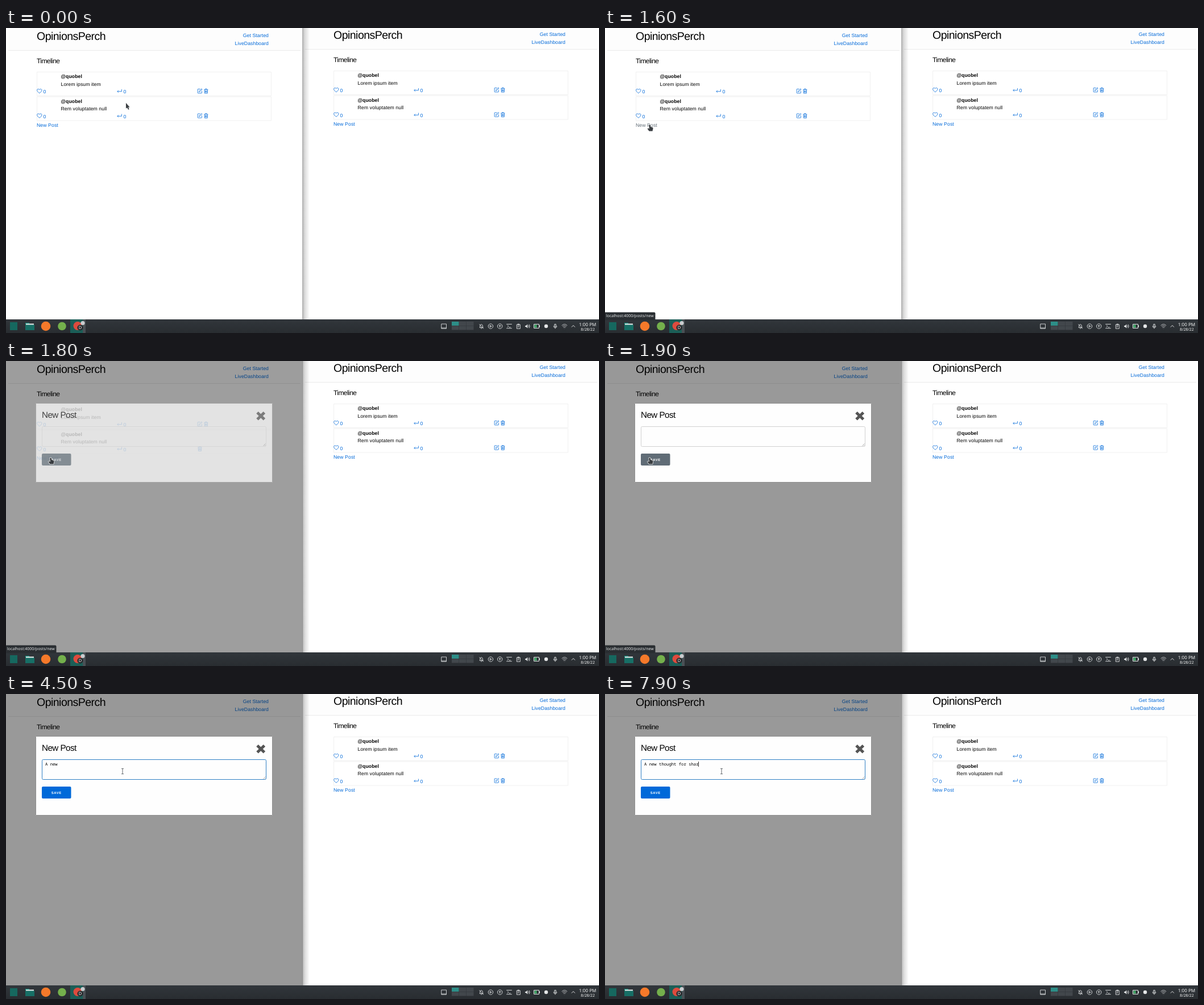
An HTML page with a canvas for the animation above (8 s loop, 1043 px wide and 537 px high).

```html
<!DOCTYPE html>
<html lang="en">
<head>
<meta charset="utf-8">
<title>Timeline</title>
<style>
  html, body { margin: 0; width: 100%; height: 100%; overflow: hidden; background: #fff; }
  canvas { display: block; }
</style>
</head>
<body>
<canvas id="stage" width="1043" height="537"></canvas>
<script>
const ctx = document.getElementById('stage').getContext('2d');
const LOOP = 8000, BLUE = '#0069d9', GREY = '#606c76', TRAY = '#e4e6e7';
const REM = 5.43, BODY = 1.6 * REM;
const SANS = '"Liberation Sans", Arial, sans-serif';
const UI = '"Noto Sans", sans-serif';
const MONO = '"Noto Sans Mono", monospace';
const MONO_SIZE = 7.24;

const ICONS = {
  heart: 'M8 14.5C-4 7 2-1 8 4C14-1 20 7 8 14.5Z',
  reply: 'M14.5 2.5V9H1.5M5 5.5L1.5 9L5 12.5',
  edit: 'M14 8v5.5a1 1 0 0 1-1 1h-10.500a1 1 0 0 1-1-1v-10.500a1 1 0 0 1 1-1h6.500M5.500 10.500l.5-2.500L13 1l2 2L8 10Z',
  trash: 'M2 3.500h12M6 3V1.500h4V3M3.200 4l.6 11h8.400l.6-11M6 6.500v6M8 6.500v6M10 6.500v6',
  screen: 'M.5 1H15.500V15H.5ZM.5 13H15.500',
  bell: 'M3 12C5 9 3 3 8 2.500C13 3 11 9 13 12ZM6.500 14.500h3M2 2L14 15',
  play: 'M8 1a7 7 0 1 0 .01 0M6 5L11 8L6 11Z',
  up: 'M8 1a7 7 0 1 0 .01 0M8 12V5M5 8L8 4.500L11 8',
  term: 'M0 2H16M0 14H16M3 5L6 8L3 11M8 11h4',
  clip: 'M3 3H13V15H3ZM6 1.500H10V4H6ZM5.500 7.500h5M5.500 10.500h3',
  mic: 'M6 2H10V9H6ZM3.500 7V9Q4 12 8 12T12.500 9V7M8 12V15',
  wifi: 'M0 6Q8-2 16 6M2.500 9Q8 3.500 13.500 9M5 12Q8 9 11 12M8 14.500v.5',
  caret: 'M3 10.500L8 5.500L13 10.500'
};
for (const k in ICONS) ICONS[k] = new Path2D(ICONS[k]);

const ARROW = new Path2D('M0 0V9.500L2.200 8.200L4 11.800L5.600 11L4 7.400H6.600Z');
const HAND = new Path2D('M-1.300 .5Q0-1 1.200 .5L1.800 3.500L5 4.500Q6.200 5 6 6.500L5 11H-1L-3.600 7.200Q-3.800 6-2.400 6L-.6 7Z');
const SPEAKER = new Path2D('M1 6H4L8 2V14L4 10H1Z');
const WAVES = new Path2D('M10.500 5Q13 8 10.500 11M12.500 2.500Q17 8 12.500 13.500');

// [time, characters shown]
const TYPING = [[3100, 1], [3300, 2], [3600, 3], [3700, 4], [3800, 6], [4800, 8], [5100, 10],
  [5200, 11], [5400, 12], [5500, 13], [5600, 14], [6400, 15], [6500, 16], [6600, 18],
  [7500, 19], [7600, 20], [7700, 21], [7900, 22]];
const MESSAGE = 'A new thought for shar';
const CARET_OFF = [[4500, 4800], [6200, 6400], [7200, 7500]];

// [time, x, y] of the pointer's hot spot
const MOVES = [[0, 211, 132], [900, 86, 170.5], [1100, 78.5, 170.5], [1900, 78.5, 170.5], [2400, 205, 136]];

const within = (t, a, b) => t >= a && t < b;
const ease = p => p * p * (3 - 2 * p);

function rect(x, y, w, h, color) {
  ctx.fillStyle = color;
  ctx.fillRect(x, y, w, h);
}

function frame(x, y, w, h, color, r = 0) {
  ctx.beginPath();
  ctx.roundRect(x + .5, y + .5, w - 1, h - 1, r);
  ctx.strokeStyle = color;
  ctx.lineWidth = 1;
  ctx.stroke();
}

function disc(x, y, r, color) {
  ctx.beginPath();
  ctx.arc(x, y, r, 0, 7);
  ctx.fillStyle = color;
  ctx.fill();
}

function text(str, x, y, { size = BODY, color = '#000', font = SANS, weight = 400, gap = .087, align = 'left' } = {}) {
  ctx.font = `${weight} ${size}px ${font}`;
  ctx.letterSpacing = gap + 'px';
  ctx.textAlign = align;
  ctx.fillStyle = color;
  ctx.fillText(str, x, y);
}

function icon(name, x, y, color = BLUE, scale = .58, line = 1.35) {
  ctx.save();
  ctx.translate(x, y);
  ctx.scale(scale, scale);
  ctx.strokeStyle = color;
  ctx.lineWidth = line;
  ctx.stroke(ICONS[name]);
  ctx.restore();
}

const heading = (str, x, y, rems) => text(str, x, y, { size: rems * REM, gap: -.1 * REM });

function post(y, body, canEdit) {
  frame(54, y, 413, 43, '#f0f0f0');
  text('@quobel', 96.5, y + 11, { weight: 700 });
  text(body, 96.5, y + 24.5);
  icon('heart', 54, y + 29, BLUE, .6);
  text('0', 65.5, y + 38, { color: BLUE });
  icon('reply', 195, y + 29.5);
  text('0', 206.5, y + 38, { color: BLUE });
  if (canEdit) icon('edit', 336.3, y + 29.3);
  icon('trash', canEdit ? 347.2 : 336.3, y + 29.3);
}

function page(dx, dy, hover, canEdit) {
  ctx.save();
  ctx.translate(dx, dy);
  rect(4, 0, 514, 39, '#fdfdfd');
  rect(4, 39, 514, 1, '#eaeaea');
  heading('OpinionsPerch', 54, 20.5, 3.6);
  text('Get Started', 462, 15.5, { color: BLUE, align: 'right' });
  text('LiveDashboard', 462, 29.5, { color: BLUE, align: 'right' });
  heading('Timeline', 54, 62, 2.2);
  post(77, 'Lorem ipsum item', true);
  post(120.5, 'Rem voluptatem null', canEdit);
  text('New Post', 54, 173.5, { color: hover ? GREY : BLUE });
  ctx.restore();
}

function modal(t, alpha, hover) {
  const error = within(t, 3200, 3300), drop = error ? 19 : 0, focus = t >= 2700;
  ctx.save();
  ctx.globalAlpha = alpha;
  rect(52, 74, 417, 140 + drop, '#fefefe');
  frame(52, 74, 417, 140 + drop, '#8e8e8e');
  heading('New Post', 63, 100, 2.8);
  ctx.strokeStyle = '#555';
  ctx.lineWidth = 5;
  ctx.beginPath();
  ctx.moveTo(442, 90.8); ctx.lineTo(454.4, 102.8);
  ctx.moveTo(454.4, 90.8); ctx.lineTo(442, 102.8);
  ctx.stroke();

  frame(63, 115, 395, 36, focus ? '#2f7fc4' : '#d1d1d1', 2);
  ctx.strokeStyle = '#777';
  ctx.lineWidth = .6;
  ctx.beginPath();
  ctx.moveTo(452.5, 149.5); ctx.lineTo(456.5, 145.5);
  ctx.moveTo(455, 149.5); ctx.lineTo(456.5, 148);
  ctx.stroke();

  let count = 0;
  for (const [at, n] of TYPING) if (t >= at) count = n;
  text(MESSAGE.slice(0, count), 69, 126, { size: MONO_SIZE, font: MONO, gap: 0 });
  if (focus && !CARET_OFF.some(([a, b]) => within(t, a, b)))
    rect(Math.floor(69 + count * MONO_SIZE * .6), 119, 1, 9, '#333');

  if (error) text('should be at least 2 character(s)', 63, 167.5, { color: '#a94442' });
  ctx.beginPath();
  ctx.roundRect(63, 163 + drop, 51.5, 21, 2);
  ctx.fillStyle = hover ? GREY : BLUE;
  ctx.fill();
  text('SAVE', 79.8, 176 + drop, { size: 1.1 * REM, weight: 700, color: '#fff', gap: .1 * REM });
  ctx.restore();
}

function taskbar() {
  const g = ctx.createLinearGradient(0, 513, 0, 537);
  g.addColorStop(0, '#31363b');
  g.addColorStop(1, '#292d31');
  rect(0, 513, 1043, 24, g);

  rect(7, 518, 13, 14, '#16685f');
  rect(34, 519, 7, 3, '#17877a');
  rect(35, 520.5, 14, 4, '#e9efee');
  rect(34, 522.5, 16, 9.5, '#176f66');
  disc(70, 525, 8.3, '#f5792a');
  disc(98.5, 525, 7.3, '#74b04c');
  rect(113, 513, 27, 24, '#1b5e57');
  rect(135, 513, 5, 24, '#4a5055');
  disc(126, 524.5, 7.5, '#dd4b3e');
  disc(130.5, 527.5, 5, '#26282b');
  text('D', 130.5, 530.3, { size: 7.5, font: UI, color: '#fff', gap: 0, align: 'center' });
  disc(135, 519.5, 3.6, '#c9cccf');

  icon('screen', 765.5, 520.5, TRAY, .58, 1.5);
  for (let i = 0; i < 6; i++)
    rect(784 + i % 3 * 13, 517 + (i > 2 ? 7.5 : 0), 12.5, 7, i ? '#42474c' : '#2d8e88');
  const tray = ['bell', 'play', 'up', 'term', 'clip'];
  tray.forEach((name, i) => icon(name, 831.3 + i * 16.3, 520.3, TRAY, .6, 1.5));
  ctx.save();
  ctx.translate(912.5, 520.3);
  ctx.scale(.6, .6);
  ctx.fillStyle = ctx.strokeStyle = TRAY;
  ctx.lineWidth = 1.4;
  ctx.fill(SPEAKER);
  ctx.stroke(WAVES);
  ctx.restore();
  frame(928, 521, 10, 8, TRAY);
  rect(929.5, 522.5, 4, 5, '#45b06c');
  rect(938, 523.5, 1, 3, TRAY);
  disc(950, 525, 3.2, TRAY);
  icon('mic', 961.2, 520.3, TRAY, .6, 1.6);
  icon('wifi', 977.5, 520.3, TRAY, .6, 1.3);
  icon('caret', 993, 520.3, TRAY, .6, 1.6);
  const clock = { font: UI, color: '#f4f5f5', gap: 0, align: 'center' };
  text('1:00 PM', 1023, 524.8, { ...clock, size: 8.1 });
  text('8/28/22', 1023.3, 532.5, { ...clock, size: 6.8 });
}

function status(alpha) {
  ctx.save();
  ctx.globalAlpha = alpha;
  ctx.beginPath();
  ctx.roundRect(-2, 500.5, 90.5, 14, 2);
  ctx.fillStyle = '#2a2e32';
  ctx.fill();
  text('localhost:4000/posts/new', 2, 509.2, { size: 6.98, font: UI, color: '#e6e8e9', gap: 0 });
  ctx.restore();
}

function pointerAt(t) {
  for (let i = 1; i < MOVES.length; i++) {
    const [a, x, y] = MOVES[i - 1], [b, u, v] = MOVES[i];
    if (t < b) {
      const p = ease((t - a) / (b - a));
      return [x + (u - x) * p, y + (v - y) * p];
    }
  }
  return MOVES[MOVES.length - 1].slice(1);
}

function pointer(x, y, kind) {
  ctx.save();
  ctx.translate(x, y);
  if (kind === 'beam') {
    ctx.strokeStyle = '#555a5e';
    ctx.lineWidth = .9;
    ctx.beginPath();
    ctx.moveTo(-2, -4.7); ctx.lineTo(2, -4.7);
    ctx.moveTo(0, -4.7); ctx.lineTo(0, 4.7);
    ctx.moveTo(-2, 4.7); ctx.lineTo(2, 4.7);
    ctx.stroke();
  } else {
    const shape = kind === 'hand' ? HAND : ARROW;
    ctx.lineJoin = 'round';
    ctx.lineWidth = 1.4;
    ctx.strokeStyle = '#f4f4f4';
    ctx.stroke(shape);
    ctx.fillStyle = '#3a3e42';
    ctx.fill(shape);
  }
  ctx.restore();
}

function draw(time) {
  const t = Math.floor(time / 100) * 100;
  const [x, y] = pointerAt(t);
  const open = t >= 1700;
  const onLink = !open && y > 166 && x < 92;
  const onSave = open && x < 115 && y > 163;
  const inField = t >= 2000 && y < 151;

  ctx.textRendering = 'geometricPrecision';
  rect(0, 0, 1043, 537, '#fff');
  page(522, -2, false, true);
  const shade = ctx.createLinearGradient(521, 0, 534, 0);
  shade.addColorStop(0, 'rgba(0,0,0,.32)');
  shade.addColorStop(.35, 'rgba(0,0,0,.14)');
  shade.addColorStop(1, 'rgba(0,0,0,0)');
  rect(521, 0, 13, 513, shade);

  page(0, 0, onLink, !open);
  if (open) {
    const [dim, solid] = t < 1800 ? [.196, .09] : t < 1900 ? [.38, .72] : [.4, 1];
    rect(0, 0, 521.5, 513, `rgba(0,0,0,${dim})`);
    modal(t, solid, onSave);
  }

  taskbar();
  if (within(t, 1300, 2200)) status(t < 1400 || t >= 2100 ? .5 : 1);
  pointer(x, y, inField ? 'beam' : onLink || onSave || within(t, 1700, 2000) ? 'hand' : 'arrow');
}

function tick() {
  draw(performance.now() % LOOP);
  requestAnimationFrame(tick);
}
tick();
</script>
</body>
</html>
```
